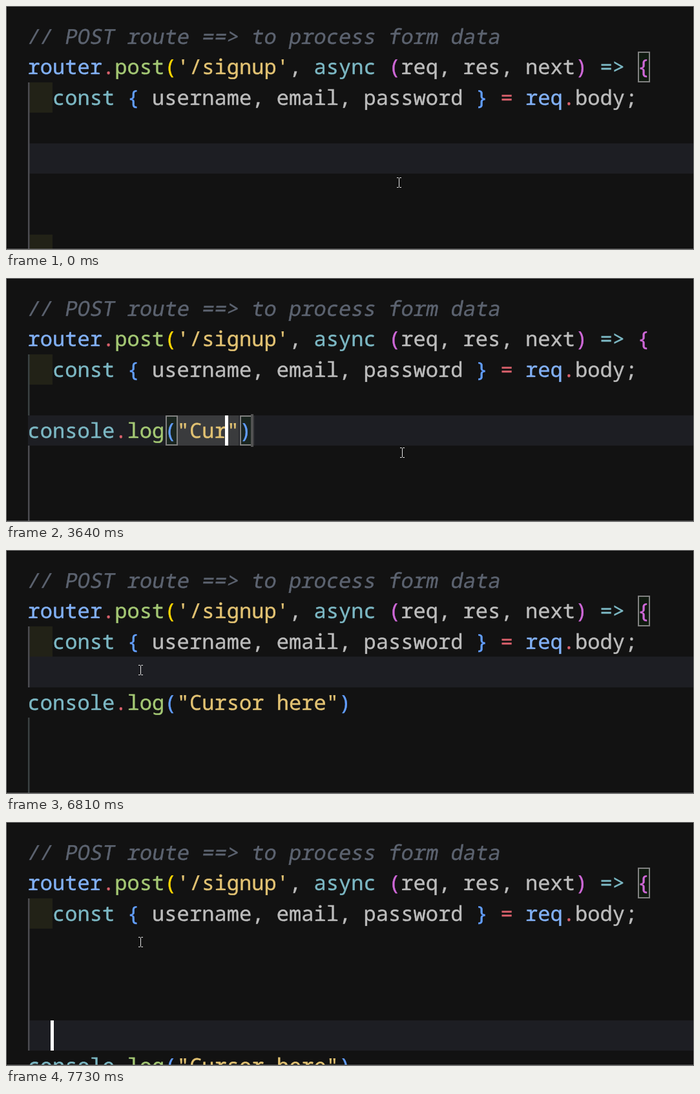
Write an HTML page that moves like this. It is 1065 px wide and 380 px high and loops after 8 s.

```html
<!DOCTYPE html>
<html lang="en">
<head>
<meta charset="utf-8">
<title>Typing in a code editor</title>
<style>
  html, body { margin: 0; width: 100%; height: 100%; overflow: hidden; background: #121212; }
  svg { display: block; width: 1065px; height: 380px; }
  text {
    font: 32.1px "Noto Sans Mono", "DejaVu Sans Mono", monospace;
    white-space: pre;
    text-rendering: geometricPrecision;
    fill: currentColor;
    stroke: currentColor;
    stroke-width: .4px;
  }
  .comment { color: #5c6370; transform: skewX(-10deg); transform-origin: 0 51px; }
  .plain { color: #bdbdbd; }
  .name { color: #82b1f7; }
  .key { color: #7cb8c4; }
  .op { color: #d9616c; }
  .call { color: #a4c874; }
  .string { color: #e3c373; }
  .gold { color: #ffd700; }
  .orchid { color: #cf68d8; }
  .blue { color: #629eff; }
</style>
</head>
<body>
<svg id="stage" viewBox="0 0 1065 380"></svg>
<script>
const LOOP = 8000;
const stage = document.getElementById('stage');

const colX = col => 34.2 + 19.26 * col;
const rowY = row => Math.round(24 + 47.45 * row);

const header = [
  [['comment', '// POST route ==> to process form data']],
  [['name', 'router'], ['op', '.'], ['call', 'post'], ['gold', '('], ['string', "'/signup'"],
   ['plain', ', '], ['key', 'async '], ['orchid', '('], ['plain', 'req, res, next'],
   ['orchid', ') '], ['key', '=> '], ['orchid', '{']],
  [['plain', '  '], ['key', 'const '], ['blue', '{ '], ['plain', 'username, email, password '],
   ['blue', '} '], ['op', '= '], ['name', 'req'], ['op', '.'], ['plain', 'body;']],
];

// Each step changes part of the editor state at its time.
const steps = [
  [0, { mouse: [608.5, 275], row: 4, col: 0, caret: false, logRow: null, string: '', snippet: false }],
  [130, { mouse: [613.5, 272] }],
  [500, { caret: true }],
  [890, { logRow: 4, snippet: true, col: 12 }],
  [1320, { caret: false }],
  [1850, { caret: true }],
  [1970, typed('')],
  [2550, typed('C')],
  [3110, { caret: false }],
  [3640, typed('Cur')],
  [3890, typed('Curs')],
  [4140, typed('Curso')],
  [4260, typed('Cursor')],
  [4410, typed('Cursor ')],
  [4660, typed('Cursor he')],
  [4940, typed('Cursor her')],
  [5220, typed('Cursor here')],
  [5610, { caret: false }],
  [6010, { mouse: [450.5, 236] }],
  [6130, { mouse: [240.5, 193], caret: true }],
  [6250, { mouse: [208.5, 187] }],
  [6400, { snippet: false, row: 3, col: 0 }],
  [6810, { caret: false }],
  [7490, { row: 4, col: 2, caret: true, logRow: 5 }],
  [7610, { row: 5, logRow: 6 }],
  [7730, { row: 6, logRow: 7 }],
];

function typed(word) {
  return { string: `"${word}"`, col: 13 + word.length, caret: true };
}

function rect(x, y, w, h, fill, extra = '') {
  return `<rect x="${x}" y="${y}" width="${w}" height="${h}" fill="${fill}" ${extra}/>`;
}

function line(tokens, row) {
  let col = 0;
  return tokens.map(([kind, text]) => {
    const xs = [...text].map(() => (colX(col++) - .7).toFixed(2)).join(' ');
    return `<text class="${kind}" x="${xs}" y="${rowY(row) + 35}">${text}</text>`;
  }).join('');
}

function bracketBox(col, row) {
  const y = rowY(row), h = rowY(row + 1) - y;
  return rect(Math.ceil(colX(col)) + 1, y + 1, 17, h - 2, '#006400',
    'fill-opacity=".1" stroke="#808080" stroke-width="2"');
}

function guide(from, to, color) {
  return rect(34, rowY(from), 2.5, Math.min(378, rowY(to)) - rowY(from), color);
}

function guides({ logRow, snippet }) {
  const bright = '#4b4b50', dim = '#3a4142';
  if (logRow === null) return guide(2, 8, bright);
  const above = guide(2, logRow, snippet ? dim : bright);
  return logRow < 7 ? above + guide(logRow + 1, 8, snippet ? bright : dim) : above;
}

function indentBlock(row) {
  return rect(34, rowY(row), 38, rowY(row + 1) - rowY(row), '#222217');
}

function snippetMarks({ string, row }) {
  const y = rowY(row), h = rowY(row + 1) - y;
  const close = 12 + string.length, end = Math.round(colX(close + 1));
  const start = string ? 266 : 264;
  const width = string ? colX(close) - 1 - start : 5;
  return rect(start, y, width, h, '#3a3b3d')
    + bracketBox(11, row) + bracketBox(close, row)
    + rect(end - 2, y - 2, 4, h + 4, '#525252')
    + rect(end + 2, y, 2, h, '#292a2e');
}

function caret({ col, row }) {
  const x = Math.max(34, Math.floor(colX(col) - 3));
  return rect(x, rowY(row), 5, rowY(row + 1) - rowY(row), '#fff');
}

function pointer([x, y]) {
  return `<path d="M-3.5-7.5h2.5l1 1 1-1h2.5M0-6.5v13M-3.5 7.5h2.5l1-1 1 1h2.5"
    transform="translate(${x} ${y})" fill="none" stroke="#e6e6e6"/>`;
}

function draw(state) {
  const { row, logRow, string, snippet } = state;
  const log = [['key', 'console'], ['op', '.'], ['call', 'log'], ['blue', '('],
    ['string', string], ['blue', ')']].filter(token => token[1]);
  stage.innerHTML = [
    rect(0, 0, 1065, 380, '#121212'),
    rect(34, rowY(row), 1030, rowY(row + 1) - rowY(row), '#1d1e23'),
    indentBlock(2),
    logRow === null ? indentBlock(7) : '',
    guides(state),
    snippet ? snippetMarks(state) : bracketBox(49, 1),
    header.map(line).join(''),
    logRow === null ? '' : line(log, logRow),
    state.caret ? caret(state) : '',
    pointer(state.mouse),
    rect(0, 0, 1065, 1, '#808080'),
    rect(0, 0, 1, 380, '#808080'),
    rect(1064, 0, 1, 380, '#808080'),
    rect(0, 378, 1065, 2, '#707070'),
  ].join('');
}

const started = performance.now();
let shown = 0;

function tick() {
  const time = (performance.now() - started) % LOOP;
  const count = steps.filter(([at]) => at <= time).length;
  if (count !== shown) {
    shown = count;
    draw(Object.assign({}, ...steps.slice(0, count).map(([, change]) => change)));
  }
  requestAnimationFrame(tick);
}
tick();
</script>
</body>
</html>
```
